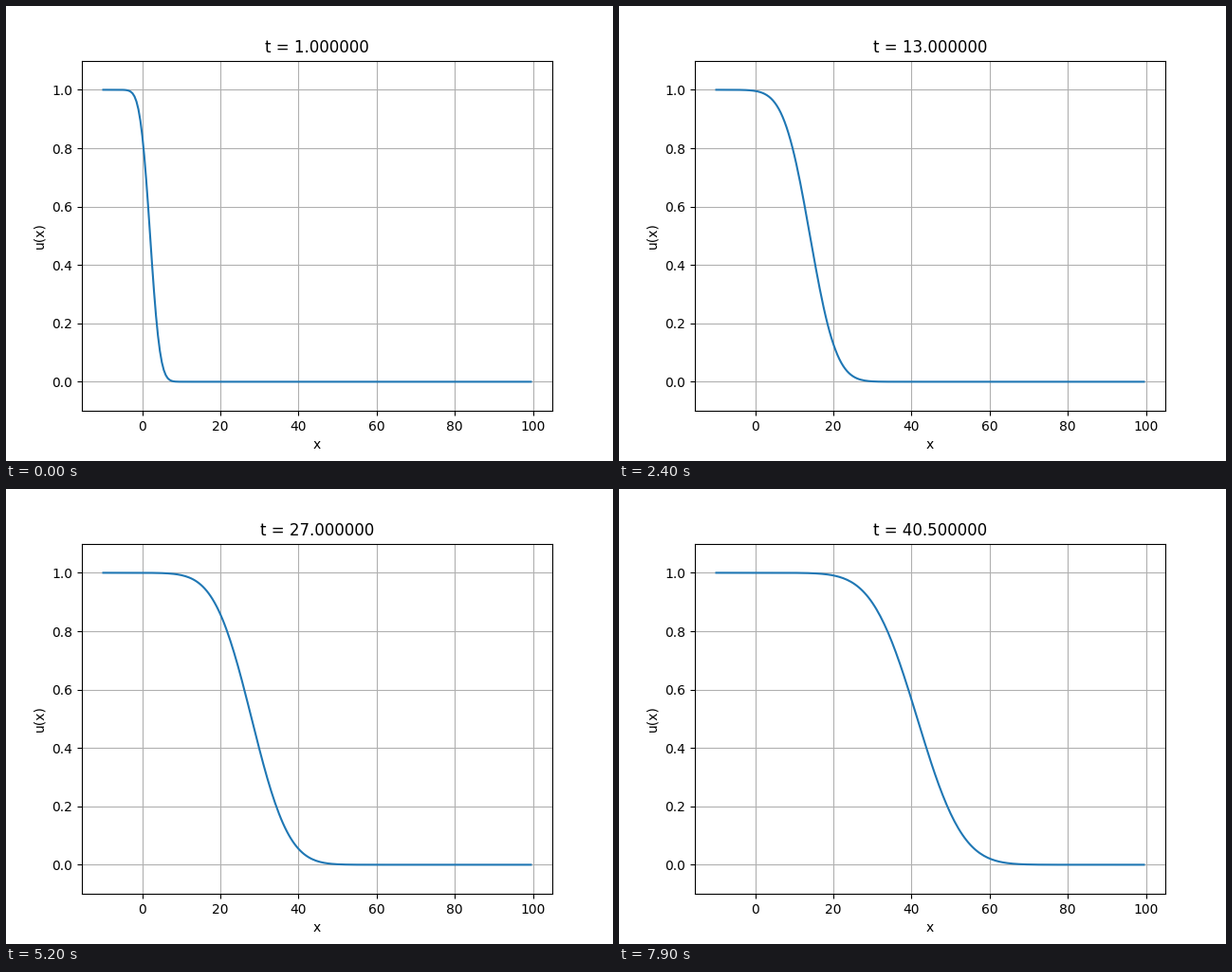
These frames come from a looping animation (640 by 480 pixels, 8000 ms). A matplotlib script:

```python
import math

import matplotlib.pyplot as plt
import numpy as np
from matplotlib.animation import FuncAnimation

FRAMES = 80
INTERVAL = 100
DT = 0.5
SPEED = 1.0
DIFFUSION = 1.0

erfc = np.vectorize(math.erfc)
x = np.arange(-10, 100, 0.5)


def front(t):
    """Advected and diffused unit step, released one time unit before t = 0."""
    age = t + 1.0
    return 0.5 * erfc((x - SPEED * age) / (2 * math.sqrt(DIFFUSION * age)))


fig, ax = plt.subplots(figsize=(6.4, 4.8), dpi=100)
line, = ax.plot(x, front(1.0))
ax.set_xlabel("x")
ax.set_ylabel("u(x)")
ax.grid(True)

# Fixed limits: the data range plus the usual 5 % margin.
pad = 0.05 * (x[-1] - x[0])
ax.set_xlim(x[0] - pad, x[-1] + pad)
ax.set_ylim(-0.05, 1.05)
ax.set_ylim(-0.1, 1.1)
title = ax.set_title("t = 1.000000")


def update(frame):
    t = 1.0 + DT * frame
    line.set_ydata(front(t))
    title.set_text(f"t = {t:f}")
    return line, title


anim = FuncAnimation(fig, update, frames=FRAMES, interval=INTERVAL,
                     repeat=True, repeat_delay=0, blit=False)
plt.show()
```
